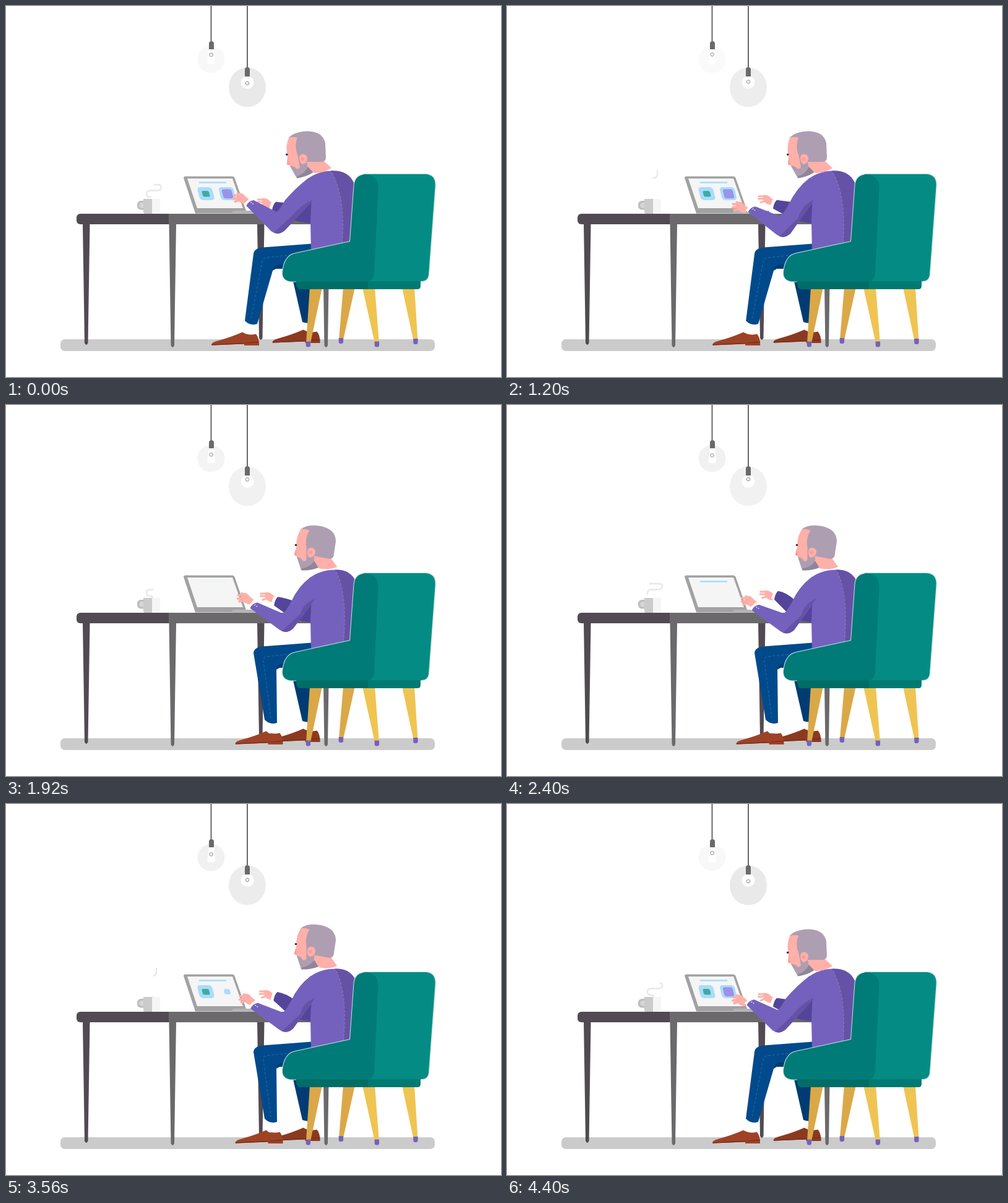
Write an HTML page with a canvas that moves like this. It is 800 by 600 pixels and loops after 4.48 s.

```html
<!DOCTYPE html>
<html lang="en">
<head>
<meta charset="utf-8">
<title>Working at a desk</title>
<style>
html, body { margin: 0; width: 100%; height: 100%; overflow: hidden; background: #fff; }
canvas { display: block; width: 800px; height: 600px; }
</style>
</head>
<body>
<canvas id="stage" width="800" height="600"></canvas>
<script>
const ctx = document.getElementById('stage').getContext('2d');
const LOOP = 4480;
const C = {
  dark: '#524a52', mid: '#6b696b', floor: '#cbcbcb', skin: '#ffb0a8', blush: '#ff9a94',
  hair: '#ae9eb2', jaw: '#91859a', knit: '#7461bd', knitDark: '#6552a7', knitFar: '#54459b',
  jeans: '#004a8c', jeansDark: '#003c73', shoe: '#9e4226', shoeFar: '#8b3a20', sole: '#7c2c1c',
  teal: '#048c84', tealDark: '#007b77', gold: '#efc452', goldDark: '#dba848', sky: '#a9dcfb'
};

const clamp = x => Math.max(0, Math.min(1, x));
const mix = (a, b, k) => a + (b - a) * k;
const mixPt = (a, b, k) => a.map((v, i) => mix(v, b[i], k));
const part = (t, start, length) => clamp((t - start) / length);
const smooth = x => x < 0.5 ? 4 * x * x * x : 1 - Math.pow(2 - 2 * x, 3) / 2;
const back = x => x <= 0 ? 0 : 1 + 3.2 * Math.pow(x - 1, 3) + 2.2 * Math.pow(x - 1, 2);
const wave = (t, peak, period) => Math.cos((t - peak) / period * 2 * Math.PI);
const gray = v => `rgb(${v},${v},${v})`;

function fill(d, color) {
  ctx.fillStyle = color;
  ctx.fill(new Path2D(d));
}
function line(d, color, width, dash = []) {
  ctx.strokeStyle = color;
  ctx.lineWidth = width;
  ctx.setLineDash(dash);
  ctx.stroke(new Path2D(d));
  ctx.setLineDash([]);
}
function box(x, y, w, h, r, color) {
  ctx.fillStyle = color;
  ctx.beginPath();
  ctx.roundRect(x, y, w, h, r);
  ctx.fill();
}
function disc(x, y, r, color) {
  ctx.fillStyle = color;
  ctx.beginPath();
  ctx.arc(x, y, r, 0, 7);
  ctx.fill();
}
function at(x, y, draw) {
  ctx.save();
  ctx.translate(x, y);
  draw();
  ctx.restore();
}
function track(keys, t) {
  let i = 1;
  while (i < keys.length - 1 && t > keys[i][0]) i++;
  const [a, b] = [keys[i - 1], keys[i]];
  return mix(a[1], b[1], part(t, a[0], b[0] - a[0]));
}

function lamps(t) {
  box(330.5, 0, 2, 60, 0, C.mid);
  box(389, 0, 2, 102, 0, C.mid);
  disc(331.5, 86.5, 22, gray(245 + 6 * wave(t, 720, LOOP)));
  ctx.fillStyle = gray(237 - 4 * wave(t, 0, LOOP));
  ctx.beginPath();
  ctx.ellipse(390, 131.5, 30, 32, 0, 0, 7);
  ctx.fill();
  fill('M328 69H335.5L338 90Q338 94 334 94H329Q325 94 325.5 90Z', '#fff');
  disc(390, 123.5, 10.5, '#fff');
  box(328, 57, 8, 13, [4, 4, 0, 0], C.mid);
  box(386, 99, 8, 15, [4, 4, 0, 0], C.mid);
  const rings = [[331.7, 80 - 2 * wave(t, 720, LOOP)], [390, 122.5 + 2.5 * wave(t, 100, LOOP)]];
  for (const [x, y] of rings) {
    ctx.strokeStyle = '#8c8c8c';
    ctx.lineWidth = 1;
    ctx.beginPath();
    ctx.arc(x, y, 2.8, 0, 7);
    ctx.stroke();
  }
}

function tableLeg(x, bottom, color) {
  fill(`M${x} 352H${x + 11.5}L${x + 8.5} ${bottom - 3}Q${x + 5.8} ${bottom + 3} ${x + 3} ${bottom - 3}Z`, color);
}
function table() {
  tableLeg(124, 548, C.dark);
  tableLeg(406, 540, C.dark);
  tableLeg(263.5, 552, C.mid);
  tableLeg(511.5, 552, C.mid);
  box(262, 336, 250, 17, 0, C.mid);
  box(114, 336, 149, 17, [6, 0, 0, 6], C.dark);
}

const steamPath = 'M237 312Q237 309 233 309Q227 309 227 303.5Q227 298.5 233 298.5H244' +
  'Q251 298.5 251 293.5Q251 289 245 289H226Q220.5 289 220.5 283.5Q220.5 278 226 278' +
  'H237Q243 278 243 272V264';
const steamHead = [[1300, 0], [1920, 29], [2240, 58], [2920, 97], [2960, 103], [3360, 116]];
const steamTail = [[2160, 0], [2920, 37], [2960, 46], [3440, 98], [3560, 100], [3700, 116]];

function steam(t) {
  for (let k = 0; k < 3; k++) {
    const time = t % 2240 + k * 2240;
    if (time < 1300 || time > 3700) continue;
    const tail = track(steamTail, time);
    const size = track(steamHead, time) - tail;
    if (size <= 0) continue;
    ctx.lineDashOffset = -tail;
    line(steamPath, '#e8e8e8', 2.4, [size, 300]);
    ctx.lineDashOffset = 0;
  }
}
function cup() {
  box(212, 315, 15, 14.5, [6, 0, 0, 6], '#bebebe');
  box(215.5, 318, 8, 8.5, [4, 0, 0, 4], '#d6d6d6');
  box(222, 312, 14, 24, [0, 0, 0, 3], '#cbcbcb');
  box(236, 312, 13, 24, [0, 0, 3, 0], '#f5f5f5');
}

function tile(x, y, w, h, r, scale, color) {
  if (scale <= 0) return;
  ctx.save();
  ctx.transform(scale, 0, 0.25 * scale, scale, x, y);
  box(-w / 2, -h / 2, w, h, r, color);
  ctx.restore();
}
function laptop(t) {
  fill('M290 275.5H366Q368.5 275.5 369.5 278L388 331H424V335.5H306L287 278Q287 275.5 290 275.5Z', '#a2a2a2');
  fill('M293 279H366L383 327H309Z', '#f5f5f5');
  box(366, 331, 56, 4.5, 1, '#b4b4b4');

  const gone = part(t, 1640, 220);
  const fresh = t > 1870;
  const show = start => fresh ? back(part(t, start, 400)) : 1;
  ctx.globalAlpha = fresh ? part(t, 1880, 320) : 1 - gone;
  line('M312 285.5H356', C.sky, 2.5);
  ctx.globalAlpha = fresh ? 1 : 1 - gone;
  tile(323, 303.5, 24, 21, 5, show(2680), C.sky);
  tile(323, 303.7, 11.5, 9.5, 2.5, show(2800), '#40aaa2');
  tile(357.5, 303.5, 24, 21, 5, show(3526), C.sky);
  tile(358, 303.7, 16, 15, 3.5, show(3646), '#9d92ea');
  ctx.globalAlpha = 1;
}

function shoe(x, y, color) {
  at(x, y, () => {
    fill('M0 20Q1 16 10 14Q32 8 50 0Q60 6 72 3Q77 9 77 20L54 19L0 21Z', color);
    line('M0.5 20.5L54 18L77 16', C.sole, 1.3);
    fill('M53 18H77V21.5H53Z', color);
  });
}
function legs(p) {
  fill('M486 508H504V530H484Z', '#fff');
  shoe(430.5, 523.5, C.shoeFar);
  fill('M464 445H500L492 512Q486 514 479 511Z', C.jeansDark);

  const a = mix(386, 418, p), b = mix(407, 439, p);
  const knee = mix(431, 437, p), dx = 38.5 * p;
  fill(`M${a + 2} 508H${b - 3}L${b - 4} 535H${a - 2}Z`, '#fff');
  shoe(332 + dx, 527.5, C.shoe);
  fill(`M${a + 1} 511L${b - 3} 511L${b - 4} 529Q${b - 14} 534 ${a + mix(-1, 4, p)} 528Z`, '#fff');
  fill(`M500 384L414 390.5Q401 392 400 401L${a} 509Q${a + 9} 518 ${b - 1} 514L${knee} 428` +
    `Q${knee + 1} 424 ${knee + 6} 424H500Z`, C.jeans);
  fill(`M${knee} 428Q${knee + 1} 419 ${knee + 10} 418H470V425H${knee + 5}Z`, C.jeansDark);
  line(`M468 402L420 407Q415 408 ${mix(414, 416, p)} 414L${a + 10} 506`, '#3a70a6', 0.8, [4, 3]);
}

function head(p) {
  ctx.save();
  ctx.translate(mix(485, 496.5, p), mix(254, 246, p));
  ctx.rotate(p * 11 * Math.PI / 180);
  ctx.translate(-485, -254);
  fill('M482 249L512 249L526 262Q512 271 498 270L486 261Z', C.skin);
  fill('M457 213Q466 203 488 202.5Q512 203 516 222L517 246Q516 252 509 252L486 252L488 263L496 269Q484 276 470 278.5L459 259L467 235Z', C.hair);
  fill('M488 260L496.5 269Q484 277 470 278.5L471 275Q483 271 488 260Z', C.jaw);
  fill('M457 213Q466 211 471 213Q467 222 469 234Q472 242 473 249L475 261L471 264L466 260L459.5 258L454.5 256.5L455 242Q451 228 457 213Z', C.skin);
  fill('M455 246L454 256.5L459 257.5Z', C.blush);
  box(452, 238.7, 3.5, 3, 1.3, '#34234f');
  fill('M474 245Q475 239 481 239.5Q487 241 487 247Q486 255 479 256Q474 253 474 245Z', C.skin);
  disc(479.3, 247.5, 2.8, C.blush);
  ctx.restore();
}

function torso(p) {
  const d = 3.5 * p;
  fill(`M${489 + d} 277Q${502 + d} 262 ${528 + d} 262L${532 + d} 272L${492 + d} 282Z`, '#fff');
  fill(`M${486 + d} 281Q${502 + d} 267 ${528 + d} 266.5Q${553 + d} 266 ${562 + d} 286L564 395H493L492 348L494 310Z`, C.knit);
  fill(`M${525 + d * 2} 266.5Q${553 + d} 265 ${562 + d} 286L564 395H${543 + d * 0.6}Q${549 + d} 305 ${525 + d * 2} 266.5Z`, C.knitDark);
  line(`M${527 + d * 2} 270Q${549 + d} 310 ${543 + d * 0.6} 384`, '#9a83a8', 0.9, [4, 2.5]);
}

function hand(x, y) {
  at(x, y, () => {
    ctx.lineCap = 'round';
    line('M3 5L14 4M2.5 10.5L13 9M5 15L15 12M9 2L18 8', C.skin, 3.6);
    ctx.lineCap = 'butt';
    fill('M8 2Q16 -1 21 6L28 12L22 20Q12 18 8 11Z', C.skin);
    line('M4 8L13 7M4 13L13 11', C.blush, 0.7);
  });
}

function farArm(p, u) {
  const [x, y] = mixPt([432, 323 + 4 * u], [435 + u, 315.5 + 8 * u], p);
  const [hx, hy] = mixPt([405, 308.5 + 7 * u], [409.5 + 2 * u, 301.5 + 2.5 * u], p);
  at(hx, hy, () => {
    ctx.lineCap = 'round';
    line('M2 3L13 3M1.5 7L13 7M5 13L14 10', C.skin, 3);
    ctx.lineCap = 'butt';
    fill('M9 1Q16 0 21 5L26 9L21 17Q13 16 9 10Z', C.skin);
  });
  fill(`M${x - 3} ${y - 7}L${x + 5} ${y - 8}L${x} ${y + 8}L${x - 7} ${y + 5}Z`, '#fff');
  fill(`M${x + 4} ${y - 7}Q${x + 18} ${y - 5} 468 318L496 314V352Q475 350 462 345L${x - 2} ${y + 7}Q${x - 1} ${y - 2} ${x + 4} ${y - 7}Z`, C.knitFar);
}

function nearArm(p, u, dip) {
  const [hx, hy] = mixPt([364.5 + 4 * u, 303 - 8 * u], [373 - 4 * u, 303.5 - 4 * u], p);
  const [wx, wy] = mixPt([394 + u, 319.5 - 3 * u], [400.5 - u, 325 - 3 * u], p);
  const x = wx + 2 * dip, y = wy + 8 * dip;
  const ex = mix(438, 451, p) + 7 * dip, ey = mix(363, 362, p) - 2 * u + 4 * dip;
  const ix = mix(437, 447, p) + 4 * dip, iy = mix(333, 337, p) + 7 * dip;
  const d = 3.5 * p;
  hand(hx, hy + 8 * dip);
  fill(`M${x - 5} ${y + 5}L${x - 10} ${y + 1}L${x + 1} ${y - 9}L${x + 7} ${y - 5}Z`, '#fff');
  fill(`M${489 + d} 278Q${468 + d} 294 ${ix + 14} ${iy - 19}Q${ix + 4} ${iy - 1} ${ix} ${iy}` +
    `L${x + 6} ${y - 5}Q${x - 2} ${y - 4} ${x - 6} ${y + 4}L${ex - 9} ${ey + 2}` +
    `Q${ex + 2} ${ey + 10} ${ex + 13} ${ey}L${495 + d} 316L520 285Z`, C.knit);
  fill(`M${496 + d} 313Q${476 + d} 322 ${ex + 25} ${ey - 24}L${ex - 5} ${ey + 4}` +
    `Q${ex + 4} ${ey + 8} ${ex + 13} ${ey}L${493 + d} 318Z`, C.knitDark);
  disc(x + 2, y - 1, 0.9, '#ffe9d8');
  disc(x + 5, y + 1, 0.9, '#ffe9d8');
}

function chairLeg(x, w, foot, bottom, color) {
  fill(`M${x} 455H${x + w}L${foot + 7} ${bottom - 6}H${foot}Z`, color);
  box(foot - 0.3, bottom - 9, 7.4, 9, [0, 0, 3, 3], C.knit);
}
function chair() {
  chairLeg(491, 20, 485, 551.5, C.goldDark);
  chairLeg(545, 19, 538, 546, C.goldDark);
  chairLeg(576, 20, 596, 551.5, C.gold);
  chairLeg(640, 20, 658.5, 547, C.gold);
  const rear = 'M578 272H678Q695 273 693.5 292L683 434Q682 445 671 445H580Z';
  const side = 'M562.5 290Q564 272.5 582 272.5Q602 274 601.5 295L595 432Q594 445.5 582 445.5' +
    'H462Q446 445 447 430Q450 403 468 400L556 381Z';
  line(rear, '#c8e3df', 2.5);
  line(side, '#c8e3df', 2);
  fill('M469 440H586V458H474Q469 456 469 448Z', '#006d66');
  fill('M585 440H670V453Q670 458 665 458H585Z', '#007a72');
  fill(rear, C.teal);
  fill(side, C.tealDark);
}

function draw(t) {
  const p = smooth(part(t, 1140, 640)) - smooth(part(t, 3620, 660));
  const u = wave(t, 140, 640);
  const dip = Math.exp(-Math.pow((t - 1200) / 150, 2));
  ctx.fillStyle = '#fff';
  ctx.fillRect(0, 0, 800, 600);
  lamps(t);
  box(88, 539, 605, 19, 7, C.floor);
  table();
  steam(t);
  cup();
  laptop(t);
  legs(p);
  farArm(p, u);
  torso(p);
  head(p);
  nearArm(p, u, dip);
  chair();
}

const begin = performance.now();
function tick() {
  draw((performance.now() - begin) % LOOP);
  requestAnimationFrame(tick);
}
tick();
</script>
</body>
</html>
```
